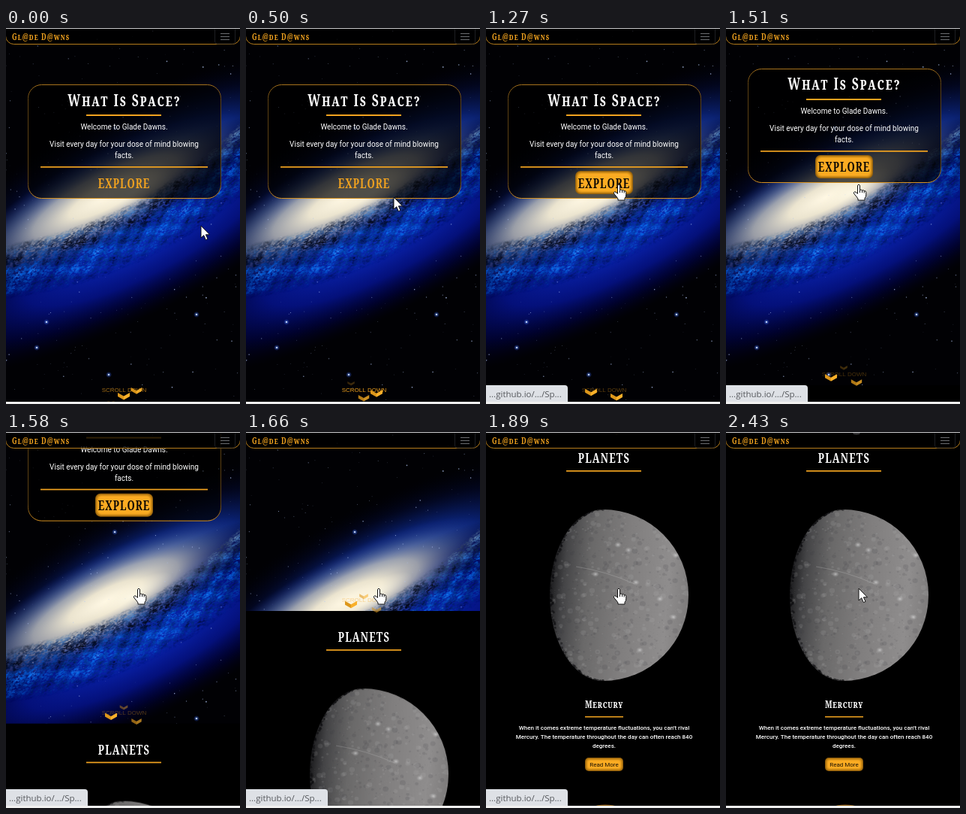
Animation of 312x500 px, one loop 2580 ms. Source, as an HTML page with a canvas:

```html
<!DOCTYPE html>
<html lang="en">
<head>
<meta charset="utf-8">
<title>Space page</title>
<style>
  html, body { margin: 0; width: 100%; height: 100%; overflow: hidden; background: #000; }
  canvas { display: block; }
</style>
</head>
<body>
<canvas id="stage" width="312" height="500"></canvas>
<script>
const W = 312, H = 500, LOOP = 2580, HERO = 496, TAU = Math.PI * 2;
const GOLD = '#f2a31f', CONDENSED = 0.72;
const ctx = document.getElementById('stage').getContext('2d');

// Moments at which the screen is refreshed
const TICKS = [0, 70, 140, 220, 290, 360, 430, 500, 570, 650, 730, 800, 880, 960, 1030, 1110,
  1190, 1270, 1350, 1430, 1510, 1580, 1660, 1740, 1810, 1890, 2200, 2270, 2350, 2430];

const clamp = v => Math.min(1, Math.max(0, v));
const mix = (a, b, p) => a + (b - a) * p;
const easeOut = p => 1 - (1 - p) ** 2;

function seeded(seed) {
  return () => (seed = (seed * 16807) % 2147483647) / 2147483647;
}

function layer(w, h, paint) {
  const c = document.createElement('canvas');
  c.width = w;
  c.height = h;
  paint(c.getContext('2d'));
  return c;
}

function glow(g, x, y, rx, ry, ...stops) {
  g.save();
  g.translate(x, y);
  g.scale(rx, ry);
  const fill = g.createRadialGradient(0, 0, 0, 0, 0, 1);
  stops.forEach((s, i) => fill.addColorStop(i / (stops.length - 1), s));
  g.fillStyle = fill;
  g.fillRect(-1, -1, 2, 2);
  g.restore();
}

function dot(g, x, y, rx, ry, color) {
  g.fillStyle = color;
  g.beginPath();
  g.ellipse(x, y, rx, ry, 0, 0, TAU);
  g.fill();
}

// Dust and blue arms on the near side: cloudy bands that follow a shallow curve
function dustLanes(g, rnd) {
  for (let i = 0; i < 13000; i++) {
    const x = rnd() * 460 - 240, d = rnd(), y = 10 + d * 76 - 0.0009 * x * x;
    const cloud = (Math.sin(x * 0.045 + y * 0.11) + Math.sin(x * 0.11 - y * 0.23 + 1.3)
      + Math.sin(x * 0.23 + y * 0.31 + 4)) / 3 + rnd() * 0.8 - 0.4;
    const base = d < 0.3 ? mix(0.75, 0.2, d / 0.3) : 0.2 + 0.36 * Math.sin((d - 0.3) / 0.7 * Math.PI);
    const v = clamp(base + 0.36 * cloud);
    const alpha = 0.6 * (1 - d ** 3) * clamp(d * 8);
    dot(g, x, y, 0.8 + rnd() * 1.8, 0.5 + rnd() * 0.7,
      `hsla(${226 - 16 * v}, ${mix(18, 92, clamp(d * 2.6))}%, ${4 + 58 * v}%, ${alpha})`);
  }
}

const galaxy = layer(W, H, g => {
  const rnd = seeded(77);
  g.fillStyle = '#010104';
  g.fillRect(0, 0, W, H);

  g.save();
  g.translate(165, 222);
  g.rotate(-0.48);
  glow(g, 25, -5, 320, 112, '#1d45c8', '#143aa8', '#0a2170', 'rgba(3,9,45,.6)', 'rgba(0,0,10,0)');
  glow(g, -10, 58, 350, 98, '#0b2cb4', '#081ea0', '#04107a', 'rgba(0,2,60,.75)', 'rgba(0,0,20,0)');
  glow(g, -30, -12, 215, 60, '#fff8e4', '#ebe4cf', 'rgba(180,182,182,.85)', 'rgba(85,105,150,.5)', 'rgba(20,40,130,0)');
  dustLanes(g, rnd);
  glow(g, 5, -2, 60, 18, 'rgba(255,250,232,.85)', 'rgba(255,245,220,0)');
  g.restore();

  for (let i = 0; i < 280; i++) {
    const s = 0.3 + rnd() ** 3 * 0.6;
    dot(g, rnd() * W, rnd() * H, s, s, `rgba(180,200,245,${0.25 + rnd() * 0.6})`);
  }
  for (const [x, y] of [[254, 381], [54, 391], [145, 133], [41, 425], [137, 461]]) {
    glow(g, x, y, 4, 4, 'rgba(110,160,255,.8)', 'rgba(40,80,220,0)');
    dot(g, x, y, 1.1, 1.1, '#dce9ff');
  }
});

const planet = layer(W, 234, g => {
  const rnd = seeded(41), cx = 156, cy = 117, r = 114;
  g.beginPath();
  g.arc(cx, cy, r, -Math.PI / 2, Math.PI / 2);
  g.ellipse(cx, cy, 71, r, 0, Math.PI / 2, Math.PI * 1.5);
  g.clip();
  const shade = g.createLinearGradient(85, 100, 270, 117);
  [[0, '#1a1a1c'], [0.1, '#444446'], [0.28, '#6a6969'], [0.55, '#807e7e'], [0.85, '#8f8d8d'], [1, '#7e7c7c']]
    .forEach(s => shade.addColorStop(...s));
  g.fillStyle = shade;
  g.fillRect(0, 0, W, 234);
  for (let i = 0; i < 1600; i++) {
    const s = 0.4 + rnd() ** 4 * 3.5;
    dot(g, 85 + rnd() * 185, 3 + rnd() * 228, s, s * 0.9,
      rnd() < 0.5 ? 'rgba(50,50,53,.13)' : 'rgba(195,195,195,.13)');
  }
  // Rough shadow line
  for (let i = 0; i < 220; i++) {
    const a = Math.PI / 2 + rnd() * Math.PI, k = 0.94 + rnd() * 0.08, s = 0.6 + rnd() * 1.4;
    dot(g, cx + 71 * k * Math.cos(a), cy + r * Math.sin(a), s, s, 'rgba(8,8,10,.45)');
  }
  [[190, 57], [146, 89], [253, 64], [250, 146], [200, 100], [176, 50], [205, 190], [232, 122]]
    .forEach(([x, y]) => glow(g, x, y, 5, 4, 'rgba(235,235,235,.6)', 'rgba(190,190,190,0)'));
  g.strokeStyle = 'rgba(215,215,215,.25)';
  g.beginPath();
  g.moveTo(120, 79);
  g.quadraticCurveTo(160, 85, 198, 102);
  g.stroke();
});

function label(text, x, y, font, color, align = 'center') {
  ctx.font = font;
  ctx.fillStyle = color;
  ctx.textAlign = align;
  ctx.fillText(text, x, y);
}

function slab(text, x, y, size, color, gap, align) {
  ctx.save();
  ctx.translate(x, y);
  ctx.scale(CONDENSED, 1);
  ctx.letterSpacing = gap / CONDENSED + 'px';
  label(text, 0, 0, `small-caps 700 ${size}px "Noto Serif", "Liberation Serif", serif`, color, align);
  ctx.restore();
}

const copy = (text, y, size, weight = 400, color = '#fff') =>
  label(text, 157.5, y, `${weight} ${size}px Roboto, sans-serif`, color);

function bar(x, y, w, h, color = GOLD) {
  ctx.fillStyle = color;
  ctx.fillRect(x, y, w, h);
}

function box(x, y, w, h, radii, fill, stroke) {
  ctx.beginPath();
  ctx.roundRect(x, y, w, h, radii);
  if (fill) { ctx.fillStyle = fill; ctx.fill(); }
  if (stroke) { ctx.strokeStyle = stroke; ctx.lineWidth = 1; ctx.stroke(); }
}

function button(x, y, w, h, r) {
  ['#95620d', '#b87a12', '#d48f18', '#e99f1d', '#fbab22'].forEach((color, i) =>
    box(x + i, y + i, w - 2 * i, h - 2 * i, Math.max(2, r - i / 2), color));
}

function chevron(x, age) {
  const third = Math.min(2, Math.floor(age)), e = easeOut(age - third);
  const stops = [470, 485, 491, 499];
  const alpha = age < 0.75 ? easeOut(age / 0.75) : third < 2 ? 1 : 1 - e;
  const size = third === 0 ? mix(0.5, 1, e) : third === 2 ? mix(1, 0.5, e) : 1;
  ctx.save();
  ctx.globalAlpha = alpha;
  ctx.translate(x, mix(stops[third], stops[third + 1], e));
  for (const [side, color] of [[-1, '#dd971b'], [1, '#f9b02a']]) {
    ctx.fillStyle = color;
    ctx.beginPath();
    ctx.moveTo(0, -0.5 * size);
    ctx.lineTo(side * 8 * size, -5 * size);
    ctx.lineTo(side * 8 * size, 0);
    ctx.lineTo(0, 4.5 * size);
    ctx.fill();
  }
  ctx.restore();
}

function hero(t) {
  const edge = ctx.createLinearGradient(0, 75, 0, 227);
  edge.addColorStop(0, '#a8731c');
  edge.addColorStop(0.15, '#5c4013');
  edge.addColorStop(0.85, '#5c4013');
  edge.addColorStop(1, '#d8921f');
  box(29.5, 75.5, 257, 151, 18, 'rgba(0,0,0,.68)', edge);
  slab('What Is Space?', 158, 103.5, 22, '#fff', 1.9);
  bar(107, 115, 100, 2);
  copy('Welcome to Glade Dawns.', 135, 10);
  copy('Visit every day for your dose of mind blowing', 158, 10);
  copy('facts.', 173, 10);
  bar(46, 184, 223, 1.7);
  const lit = t >= 570;
  if (lit) button(119, 190, 77, 31, 7);
  slab('EXPLORE', 157.5, 212.5, 18, lit ? '#0c0803' : GOLD, 1);

  const pulse = Math.abs((t + 550) % 2000 / 1000 - 1);
  ctx.globalAlpha = mix(1, 0.25, pulse);
  label('SCROLL DOWN', 157.5, 484, '8px "Liberation Sans", Arial, sans-serif', GOLD);
  ctx.globalAlpha = 1;
  [140, 157, 174].forEach((x, i) => chevron(x, (t / 1000 + 2.6 - i) % 3));
}

function planets() {
  slab('PLANETS', 157.5, 537, 18, '#fff', 1.2);
  bar(107, 547, 100, 1.7);
  ctx.drawImage(planet, 0, 596);
  slab('Mercury', 157.5, 863, 14, '#fff', 0.7);
  bar(132, 874, 51, 1.5);
  copy('When it comes extreme temperature fluctuations, you can\u2019t rival', 892, 8, 500);
  copy('Mercury. The temperature throughout the day can often reach 840', 904, 8, 500);
  copy('degrees.', 916, 8, 500);
  button(132, 929, 51, 18, 5);
  copy('Read More', 941, 8, 400, '#1a1204');
  dot(ctx, 159, 994, 14, 2.6, '#8a5a10');
}

function nav() {
  box(-0.5, -6, W + 1, 27.5, [0, 0, 11, 11], 'rgba(0,0,0,.8)', '#b57c1b');
  slab('Gl@de D@wns', 8, 15.5, 12, GOLD, 1.1, 'left');
  box(278.5, -4, 27, 25, 3, null, '#1d1f22');
  [7, 11, 15].forEach(y => bar(286, y, 12, 1, '#6c6e71'));
}

const ARROW = new Path2D('M0 0V16L3.7 12.7 6.4 18.7 9 17.5 6.4 11.8H11.5Z');
const HAND = new Path2D('M-1.5 1.2Q0-.8 1.5 1.2V7.5Q3.2 6.2 4.5 8Q6.2 6.8 7.2 8.7Q9.6 8 9.8 10.6V14Q9.6 17 8 18.2V21H-1V19Q-3 16-6 12.8Q-7.6 10.4-5.6 9.8Q-4 9.5-1.5 12.3Z');
const FINGERS = new Path2D('M1.5 7.5V11M4.5 8V11M7.2 8.7V11.5');

function pointer(t) {
  const a = clamp(t / 500), b = clamp((t - 500) / 150);
  const hand = t >= 570 && t < 2200;
  ctx.save();
  ctx.translate(260 - 63 * a - 20 * b, 263 - 38 * a - 17 * b);
  ctx.lineWidth = 1;
  ctx.strokeStyle = '#111';
  ctx.fillStyle = '#fff';
  ctx.fill(hand ? HAND : ARROW);
  ctx.stroke(hand ? HAND : ARROW);
  if (hand) ctx.stroke(FINGERS);
  ctx.restore();
}

function statusBar(t) {
  ctx.globalAlpha = t < 2000 ? clamp((t - 730) / 300) : clamp((2380 - t) / 250);
  box(-1, 475, 110, 23, [0, 4, 0, 0], '#dee1e6');
  label('...github.io/.../Sp...', 4, 490.5, '11.5px "Open Sans", "Noto Sans", sans-serif', '#55585c', 'left');
  ctx.globalAlpha = 1;
}

function draw(now) {
  const t = TICKS.findLast(tick => tick <= now % LOOP);
  const scroll = HERO * (1 - Math.cos(Math.PI * clamp((t - 1458) / 394))) / 2;

  bar(0, 0, W, H, '#000');
  ctx.save();
  ctx.beginPath();
  ctx.rect(0, 0, W, HERO - scroll);
  ctx.clip();
  ctx.drawImage(galaxy, 0, 0);
  ctx.restore();

  ctx.save();
  ctx.translate(0, -scroll);
  hero(t);
  planets();
  ctx.restore();

  nav();
  if (t >= 2430) dot(ctx, 174, 1, 5, 2.5, '#3a3a3c');
  statusBar(t);
  pointer(t);
  bar(0, 0, W, 1, '#c9cacc');
  bar(0, 497, W, 3, '#f1f1f0');
}

let start;
function tick(now) {
  start ??= now;
  draw(now - start);
  requestAnimationFrame(tick);
}
requestAnimationFrame(tick);
</script>
</body>
</html>
```
